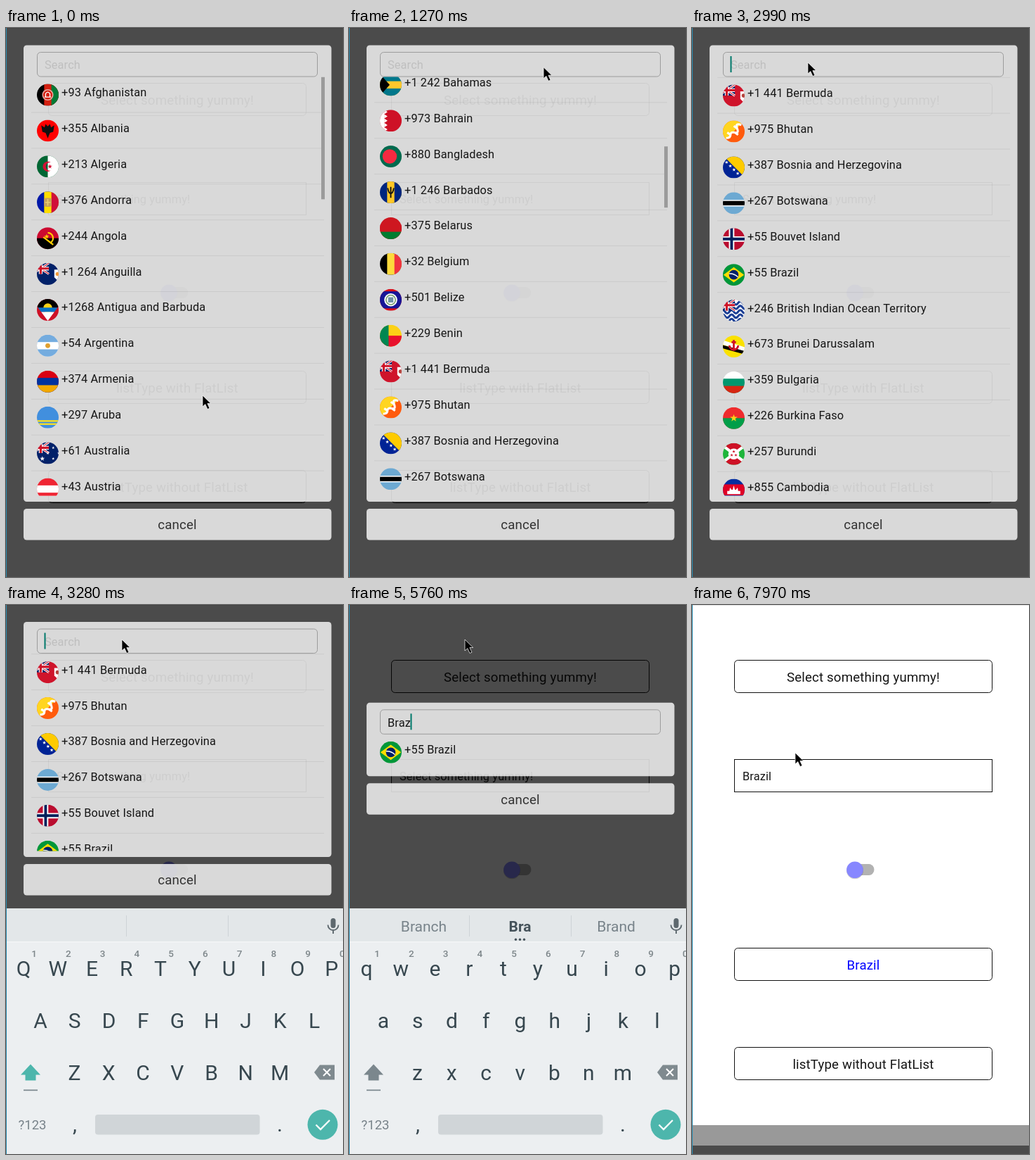
These frames come from a looping animation (480x780 px, 8 s). An HTML page:

```html
<!DOCTYPE html>
<html lang="en">
<head>
<meta charset="utf-8">
<title>Country picker</title>
<style>
html, body { margin: 0; width: 100%; height: 100%; overflow: hidden; background: #fff; }
svg { display: block; width: 480px; height: 780px; font-family: Roboto, sans-serif; }
.big { font-size: 18.69px; letter-spacing: .15px; text-anchor: middle; fill: #161616; }
.body { font-size: 16.35px; letter-spacing: .12px; fill: #161616; }
.frame { fill: none; stroke: #111; }
.key { font-size: 30px; text-anchor: middle; fill: #37474f; }
.hint { font-size: 13.5px; font-weight: 500; text-anchor: middle; fill: #7d868a; }
.word { font-size: 21px; text-anchor: middle; fill: #78838a; }
.word.main { font-weight: 700; fill: #45525a; }
.small { font-size: 18.5px; }
</style>
</head>
<body>
<svg id="stage" viewBox="0 0 480 780"></svg>
<script>
const LOOP = 8000, ROW = 50.91, KEY = 48.75;
const NAVY = '#012169', RED = '#ce1126', GOLD = '#fcd116', WHITE = '#fff';

const repeat = (n, draw) => Array.from({ length: n }, (_, i) => draw(i)).join('');
const box = (x, y, w, h, c, more = '') => `<rect x="${x}" y="${y}" width="${w}" height="${h}" fill="${c}" ${more}/>`;
const dot = (x, y, r, c) => `<circle cx="${x}" cy="${y}" r="${r}" fill="${c}"/>`;
const fill = (d, c) => `<path d="${d}" fill="${c}"/>`;
const line = (d, c, w = 1) => `<path d="${d}" fill="none" stroke="${c}" stroke-width="${w}"/>`;
const label = (x, y, cls, text, more = '') => `<text x="${x}" y="${y}" class="${cls}" ${more}>${text}</text>`;

// Flags live in a square from -10 to 10 that is cut to a disc.
const field = c => box(-10, -10, 20, 20, c);
const across = (...cs) => cs.map((c, i) => box(-10, -10 + 20 / cs.length * i, 20, 20, c)).join('');
const upright = (...cs) => cs.map((c, i) => box(-10 + 20 / cs.length * i, -10, 20, 20, c)).join('');
const band = (half, c) => box(-10, -half, 20, 2 * half, c);
const hoist = (reach, c) => fill(`M-10-10L${reach} 0L-10 10Z`, c);
const star = (x, y, r, c) => fill('M' + Array.from({ length: 10 }, (_, i) => {
  const a = i * Math.PI / 5, d = i % 2 ? r * .4 : r;
  return `${(x + d * Math.sin(a)).toFixed(2)} ${(y - d * Math.cos(a)).toFixed(2)}`;
}).join('L') + 'Z', c);
const ring = (n, cx, radius, size, c) => repeat(n, i => {
  const a = i * 2 * Math.PI / n;
  return star(cx + radius * Math.sin(a), -radius * Math.cos(a), size, c);
});
const moon = (x, r, c) => fill(`M${x + .6 * r} ${-.8 * r}A${r} ${r} 0 1 0 ${x + .6 * r} ${.8 * r}A${.82 * r} ${.82 * r} 0 1 1 ${x + .6 * r} ${-.8 * r}Z`, c);
const saltire = 'M-14-10L1 0M-14 0L1-10', cross = 'M-6.5-10V0M-14-5H1', nordic = 'M-2-10V10M-10 0H10';
const jack = box(-10, -10, 11, 10, NAVY) + line(saltire, WHITE, 2) + line(saltire, RED, .7) + line(cross, WHITE, 3.4) + line(cross, RED, 2);
const ensign = (c, shield, crest) => field(c) + jack + (shield ? fill('M6-4H12V3L9 6L6 3Z', shield) + dot(9, 0, 1.8, crest) : '');

// Antigua's bands narrow towards the bottom point.
const wedge = (y1, y2, c) => {
  const w = y => .75 * (10 - y);
  return fill(`M${-w(y1)} ${y1}H${w(y1)}L${w(y2)} ${y2}H${-w(y2)}Z`, c);
};

const countries = [
  ['93', 'Afghanistan', upright('#000', '#d32011', '#007a36') + dot(0, 0, 5.2, '#e9a9a0') + dot(0, 0, 4.2, '#d32011') + line('M-3 2H3M-2-1Q0-4 2-1V2H-2Z', WHITE, .9)],
  ['355', 'Albania', field('#f00') + fill('M-6-5L-3-3L-2-6L0-4L2-6L3-3L6-5L5 1L2 2L0 7L-2 2L-5 1Z', '#111')],
  ['213', 'Algeria', upright('#063', WHITE) + moon(0, 4.6, '#d21034') + star(2, 0, 2.2, '#d21034')],
  ['376', 'Andorra', upright('#0018a8', '#fedd00', '#d0103a') + box(-3.5, -4, 7, 8, '#c7a05a', 'rx="2"') + line('M0-3V3M-2.5 0H2.5', '#e9cf70')],
  ['244', 'Angola', across('#cc092f', '#000') + line('M0-5A5 5 0 0 1 2 4.5M-4-1L5 6', '#ffcb00', 1.5) + star(-1, -1.5, 2.4, '#ffcb00')],
  ['1 264', 'Anguilla', ensign(NAVY, WHITE, '#f29b3a')],
  ['1268', 'Antigua and Barbuda', field(RED) + wedge(-10, -2, '#000') + ring(8, 0, 0, 5, GOLD) + dot(0, -2, 4, GOLD) + wedge(-2, 2, '#0072c6') + wedge(2, 10, WHITE)],
  ['54', 'Argentina', across('#74acdf', WHITE, '#74acdf') + dot(0, 0, 2.2, '#e0a030')],
  ['374', 'Armenia', across('#d90012', '#0033a0', '#f2a800')],
  ['297', 'Aruba', field('#418fde') + repeat(2, i => box(-10, 2.6 + 2.8 * i, 20, 1.5, '#fbe122'))],
  ['61', 'Australia', ensign(NAVY) + star(-5, 5, 2.4, WHITE) + ring(4, 5, 5, 1.4, WHITE)],
  ['43', 'Austria', across('#ef2533', WHITE, '#ef2533')],
  ['994', 'Azerbaijan', across('#00b5e2', '#ef3340', '#509e2f') + moon(-.5, 2.8, WHITE) + star(2.4, 0, 1.6, WHITE)],
  ['1 242', 'Bahamas', across('#00778b', '#ffc72c', '#00778b') + hoist(-1, '#000')],
  ['973', 'Bahrain', field(RED) + box(-10, -10, 4, 20, WHITE) + repeat(5, i => fill(`M-6 ${4 * i - 10}l3 2l-3 2Z`, WHITE))],
  ['880', 'Bangladesh', field('#006a4e') + dot(-1, 0, 6.6, '#f42a41')],
  ['1 246', 'Barbados', upright('#00267f', '#ffc726', '#00267f') + line('M0-5V5M-2.8-4Q-2 1 0 1T2.8-4', '#111', 1.2)],
  ['375', 'Belarus', across('#ce1720', '#ce1720', '#007c30')],
  ['32', 'Belgium', upright('#000', '#fdda3c', '#ef3340')],
  ['501', 'Belize', field('#d90f19') + band(7.8, '#171696') + dot(0, 0, 6, WHITE) + dot(0, 0, 4.8, '#6f9a68') + dot(0, 0, 3.8, WHITE) + box(-2.4, -2.4, 4.8, 4.8, '#6f93a8')],
  ['229', 'Benin', across(GOLD, '#e8112d') + box(-10, -10, 8, 20, '#008751')],
  ['1 441', 'Bermuda', ensign('#cf142b', WHITE, '#b5433c')],
  ['975', 'Bhutan', field('#ff5b0d') + fill('M-10-10H10L-10 10Z', '#ffd520') + line('M-7 6Q-3 6-3 3T1 1T3-3T7-6M-3 3L-6 1M1 1L4 3M3-3L0-5', WHITE, 2)],
  ['387', 'Bosnia and Herzegovina', field('#002395') + fill('M-9-10H10V9Z', '#fecb00') + repeat(6, i => star(3.4 * i - 10, 3.4 * i - 8, 1.7, WHITE))],
  ['267', 'Botswana', field('#6da9d2') + band(3, WHITE) + band(2, '#000')],
  ['55', 'Bouvet Island', field('#ba0c2f') + line(nordic, WHITE, 5) + line(nordic, '#00205b', 2.5)],
  ['55', 'Brazil', field('#009739') + fill('M-9.5 0L0-7L9.5 0L0 7Z', '#fedd00') + dot(0, 0, 4.4, NAVY) + line('M-4.2-1Q0-1.5 3.8 2', WHITE, .9)],
  ['246', 'British Indian Ocean Territory', field(WHITE) + repeat(5, i => line(`M-12 ${4 * i - 7}q2-3 4 0t4 0t4 0t4 0t4 0t4 0`, '#1c3f94', 2)) + jack],
  ['673', 'Brunei Darussalam', field('#fae100') + line('M-11-4L11 3', WHITE, 4) + line('M-11 0L11 6', '#000', 3) + line('M-4-1A4 4 0 0 0 4-1M0-6V4M-2-4H2', '#cf1126', 1.8)],
  ['359', 'Bulgaria', across(WHITE, '#00966e', '#d62612')],
  ['226', 'Burkina Faso', across('#ef2b2d', '#009e49') + star(0, 0, 3.6, GOLD)],
  ['257', 'Burundi', field('#1eb53a') + fill('M-12-10H12L-12 10H12Z', RED) + line('M-12-9L12 9M-12 9L12-9', WHITE, 2.6) + dot(0, 0, 5, WHITE) + ring(3, 0, 2.2, 1.5, RED)],
  ['855', 'Cambodia', field('#032ea1') + band(5, '#e00025') + fill('M-6 4V1H-4L-3.5-2L-2 0H-1L0-4L1 0H2L3.5-2L4 1H6V4Z', WHITE)],
  ['57', 'Colombia', across(GOLD, GOLD, '#003893', RED)],
  ['53', 'Cuba', across('#002a8f', WHITE, '#002a8f', WHITE, '#002a8f') + hoist(2, RED) + star(-5, 0, 3, WHITE)],
  ['253', 'Djibouti', across('#6ab2e7', '#12ad2b') + hoist(2, WHITE) + star(-5, 0, 2.4, RED)],
  ['350', 'Gibraltar', across(WHITE, WHITE, RED) + fill('M-6 2V-3H-3V-5H3V-3H6V2Z', RED)],
  ['1 284', 'Virgin Islands, British', ensign(NAVY, '#006129', WHITE)]
];

const clamp = v => Math.max(0, Math.min(1, v));
const glide = (t, from, to) => {
  const p = clamp((t - from) / (to - from));
  return p * p * (3 - 2 * p);
};

const moves = [
  { from: 0, to: 0, x: 280, y: 522 },
  { from: 100, to: 370, x: 277, y: 556 },
  { from: 640, to: 1160, x: 277, y: 28 },
  { from: 1200, to: 1700, x: 278.5, y: 548 },
  { from: 1720, to: 2170, x: 277, y: 225 },
  { from: 2200, to: 2710, x: 165, y: 49 },
  { from: 6950, to: 7480, x: 245, y: 228 },
  { from: 7480, to: 7790, x: 147, y: 210 }
];
const touches = [
  { down: 360, up: 1130, name: 'Aruba' },
  { down: 1690, up: 2100, name: 'Bosnia and Herzegovina' },
  { down: 7520, up: 7880, name: 'Brazil' }
];
const strokes = [4850, 5120, 5300, 5700, 6460];
const suggestions = [
  ['', '', ''], ['Be', 'B', 'By'], ['Bring', 'Br', 'Bro'], ['Branch', 'Bra', 'Brand'],
  ['Brazil', 'Braz', 'Brazos'], ['Brazil', 'Brazi', 'Brazilian']
];
const FOCUS = 2990, CLOSE = 7870, END = 7970;

const typedCount = t => strokes.filter(s => s <= t).length;
const pointerAt = t => moves.reduce((p, m) => {
  const k = glide(t, m.from, m.to);
  return { x: p.x + (m.x - p.x) * k, y: p.y + (m.y - p.y) * k };
}, moves[0]);
const scrollAt = t => 712.5 * glide(t, 640, 1370) + 355.5 * glide(t, 1720, 2180);

const frame = (y, rx) => `<rect class="frame" x="60.5" y="${y}" width="367" height="46" rx="${rx}"/>`;
const button = (y, text, id = '') => frame(y, 5) + label(244, y + 30, 'big', text, id);
const screen = box(0, 0, 480, 780, WHITE) + box(0, 0, 480, 1, '#e4e4e4')
  + button(78.5, 'Select something yummy!')
  + frame(219.5, 0) + label(72, 249, 'body', '', 'id="choice"')
  + box(230, 368, 29.5, 16, '#b2b2b2', 'rx="8"') + dot(232, 377.3, 12, '#0003') + dot(232, 376.3, 11.8, '#8787ff')
  + button(487.5, '', 'id="listChoice"') + button(628.5, 'listType without FlatList');

const keys = (text, x, y) => [...text].map((c, i) => label(x + KEY * i, y, 'key letter', c)).join('');
const keyboard = box(0, 431, 480, 349, '#eceff1') + box(0, 431, 480, 47, '#e3e7e9') + box(0, 478, 480, 1.5, '#f4f6f7')
  + repeat(2, i => box(171 + 145 * i, 441, 1, 30, '#cdd3d6'))
  + repeat(3, i => label(106.5 + 137 * i, 464, i === 1 ? 'word main' : 'word', ''))
  + `<g id="more">${repeat(3, i => dot(237.5 + 6 * i, 475.3, 1.7, '#45525a'))}</g>`
  + box(462.5, 445, 7, 14, '#5d686e', 'rx="3.5"') + line('M458.5 454.5a7.5 7.5 0 0 0 15 0M466 462V467', '#5d686e', 1.9)
  + repeat(10, i => label(40 + KEY * i, 500, 'hint', (i + 1) % 10))
  + keys('QWERTYUIOP', 25, 526.5) + keys('ASDFGHJKL', 49, 600.5) + keys('ZXCVBNM', 97.5, 674.5)
  + '<path id="shift" d="M35 652.5l14 15h-6.5v8h-15v-8H21Z"/>' + box(25, 688.5, 20, 1.7, '#7b878d')
  + fill('M439 664l8-10.5h21v21h-21Z', '#7f8a8f') + line('M452 659l10 10m0-10l-10 10', WHITE, 2)
  + label(37.5, 745, 'word small', '?123') + label(98, 748, 'key', ',') + label(390, 748, 'key', '.')
  + box(127, 724, 234.5, 28.5, '#d0d5d8', 'rx="4"')
  + dot(451, 738.3, 21.5, '#4db6ac') + line('M441.5 738.5l6.5 6.5l13-13', WHITE, 2.3);

const rowMarkup = ([code, name, flag]) => `<g class="row"><g>
  <g transform="translate(59.5 25.5) scale(1.55)" clip-path="url(#disc)">${flag}</g>
  ${label(79, 27.5, 'body', `+${code} ${name}`)}</g>
  ${box(36, 50, 417, 1, '#000', 'class="rule" opacity=".07"')}</g>`;

const stage = document.getElementById('stage');
stage.innerHTML = `<defs>
  <clipPath id="disc"><circle r="10"/></clipPath>
  <clipPath id="window"><rect id="windowBox" x="25" y="45" width="438"/></clipPath></defs>
  ${screen}
  ${box(0, 0, 480, 780, '#000', 'id="dim"')}
  <g id="leftover">${box(0, 739, 480, 29, '#999') + box(0, 768, 480, 12, '#4b4b4b')}</g>
  <g id="modal">
    ${box(25, 0, 438.5, 0, '#f9f9f9', 'id="panel" rx="4.5" fill-opacity=".82"')}
    <rect x="44.5" y="10" width="399" height="34.5" rx="5" fill="none" stroke="#9c9c9c"/>
    ${label(55, 33.7, 'body', 'Search', 'id="prompt" style="fill:#bfbfbf"') + label(55, 33.7, 'body', '', 'id="typed"')}
    ${box(0, 15.5, 2, 23, '#00796b', 'id="caret"')}
    <g clip-path="url(#window)">${countries.map(rowMarkup).join('')}
      ${box(449, 0, 5, 0, '#9b9b9b', 'id="bar"')}</g>
    <g id="cancel">${box(25, 0, 438.5, 44.5, '#f9f9f9', 'rx="4.5" fill-opacity=".82"')}
      ${label(244, 29.3, 'big', 'cancel', 'style="fill:#333"')}</g>
  </g>
  <g id="keyboard">${keyboard}</g>
  <g id="pointer"><circle id="touch" cx="2" cy="4" r="10.3" fill="none" stroke="#111" stroke-width="1.1"/>
    <path d="M0 0V16L3.8 12.6L7 19.5L10 18.2L6.9 11.5H11.8Z" fill="#000" stroke="#fff" stroke-width=".7"/></g>
  ${box(0, 0, 1, 780, '#2b8cb0')}`;

const $ = id => document.getElementById(id);
const set = (el, attrs) => Object.entries(attrs).forEach(([k, v]) => el.setAttribute(k, v));
const show = (el, on) => { el.style.display = on ? '' : 'none'; };
const move = (el, x, y) => set(el, { transform: `translate(${x} ${y})` });
const write = (el, text) => { if (el.textContent !== text) el.textContent = text; };
const all = selector => [...stage.querySelectorAll(selector)];
const rows = all('.row'), words = all('.word').slice(0, 3), letters = all('.letter');

function drawModal(t, tick, pressed) {
  const typed = 'Brazi'.slice(0, typedCount(t));
  const query = typed.slice(0, typedCount(t - 60)).toLowerCase();
  const found = rows.filter((_, i) => countries[i][1].toLowerCase().includes(query));
  const raised = t >= FOCUS + 180;
  const height = Math.min(raised ? 280.5 : 595, found.length * ROW);
  const top = raised ? 218.3 - (height + 108) / 2 : 24.5;
  const scroll = Math.min(scrollAt(tick), Math.max(0, found.length * ROW - height));

  move($('modal'), 0, top);
  set($('panel'), { height: height + 53.5 });
  set($('windowBox'), { height });
  move($('cancel'), 0, height + 63.5);

  rows.forEach((row, i) => {
    const place = found.indexOf(row), y = 45 + place * ROW - scroll;
    const visible = place >= 0 && y > -10 && y < 45 + height;
    show(row, visible);
    if (!visible) return;
    move(row, 0, y.toFixed(2));
    set(row.firstElementChild, { opacity: countries[i][1] === pressed ? .22 : 1 });
    show(row.querySelector('.rule'), place < found.length - 1);
  });

  // The list loads in batches, so the scroll bar keeps shrinking.
  const loaded = Math.min(110, 40 + 20 * Math.floor((t + 260) / 540));
  const scale = 595 / (loaded * ROW);
  set($('bar'), { y: 45 + scroll * scale, height: 595 * scale, opacity: 1 - glide(tick, 2350, 2710) });

  write($('typed'), typed);
  show($('prompt'), !typed);
  set($('caret'), { x: typed ? 54.6 + $('typed').getComputedTextLength() : 54.5 });
  show($('caret'), typed || (t >= FOCUS && Math.floor((t - FOCUS) / 500) % 2 === 0));
}

function drawKeyboard(t) {
  move($('keyboard'), 0, 349 * (1 - glide(t, FOCUS, 3280) + glide(t, CLOSE, END)));
  const upper = t < strokes[0] + 90, hints = suggestions[typedCount(t - 120)];
  letters.forEach(el => write(el, upper ? el.textContent.toUpperCase() : el.textContent.toLowerCase()));
  words.forEach((el, i) => write(el, hints[i]));
  show($('more'), hints[1]);
  set($('shift'), { fill: upper ? '#4db6ac' : '#7b878d' });
}

function render(t) {
  const tick = Math.floor((t - 10) / 90) * 90 + 10;
  const chosen = t >= CLOSE, opened = 1 - glide(t, CLOSE, END);
  const touch = touches.find(p => t >= p.down && t < p.up);
  const pointer = pointerAt(tick);
  write($('choice'), chosen ? 'Brazil' : 'Select something yummy!');
  write($('listChoice'), chosen ? 'Brazil' : 'listType with FlatList');
  $('listChoice').style.fill = chosen ? '#00f' : '';
  set($('dim'), { opacity: .705 * opened });
  set($('modal'), { opacity: opened });
  show($('leftover'), t >= END);
  drawModal(t, tick, touch && t >= touch.down + 270 ? touch.name : '');
  drawKeyboard(t);
  move($('pointer'), pointer.x, pointer.y);
  show($('touch'), touch);
}

const start = performance.now();
function loop() {
  render((performance.now() - start) % LOOP);
  requestAnimationFrame(loop);
}
loop();
</script>
</body>
</html>
```
